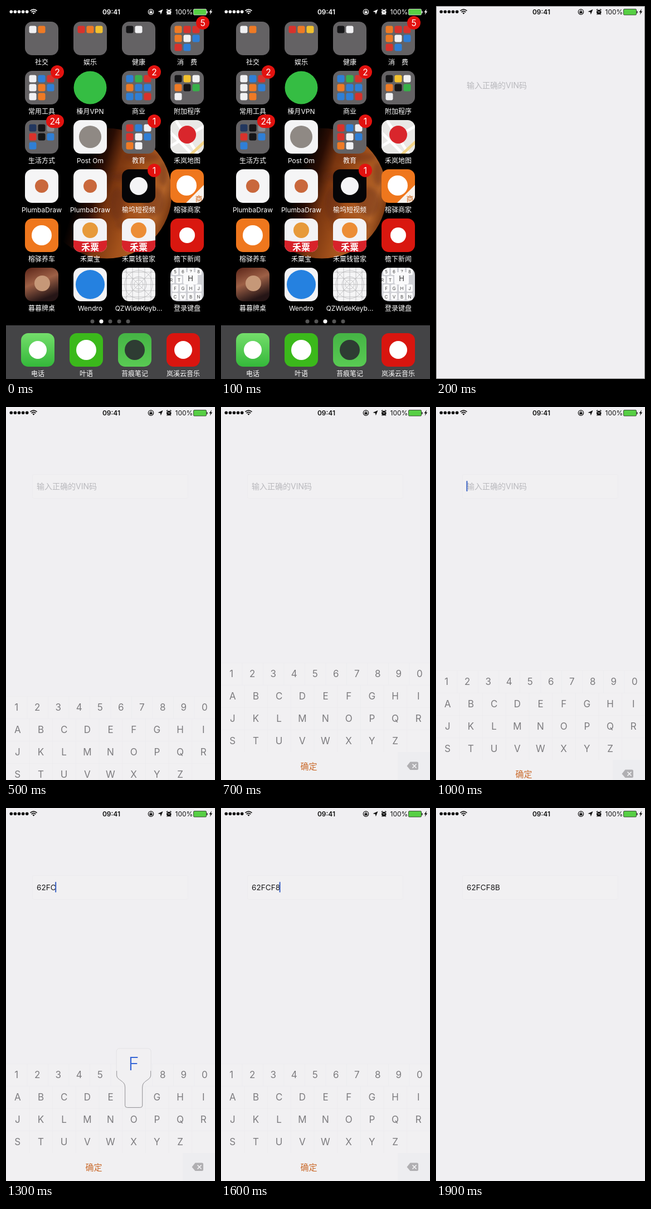
These frames come from a looping animation (375x667 px, 2 s). An HTML page:

```html
<!DOCTYPE html>
<html lang="zh-CN">
<head>
<meta charset="utf-8">
<title>Keyboard demo</title>
<style>
html, body { margin: 0; width: 100%; height: 100%; overflow: hidden; background: #000; }
svg { display: block; width: 375px; height: 667px; font-family: Inter, "Noto Sans CJK SC", "Noto Sans CJK", sans-serif; }
text { white-space: pre; }
.mid { text-anchor: middle; }
.label { font-size: 12px; fill: #fff; text-anchor: middle; }
.key { font-size: 17px; fill: #7c7b7e; text-anchor: middle; }
</style>
</head>
<body>
<svg id="stage" viewBox="0 0 375 667">
  <defs>
    <linearGradient id="mars" gradientUnits="userSpaceOnUse" x1="138" y1="305" x2="296" y2="355">
      <stop stop-color="#000"/><stop offset=".18" stop-color="#2a0d04"/><stop offset=".34" stop-color="#7a3610"/>
      <stop offset=".6" stop-color="#a4521b"/><stop offset=".88" stop-color="#b5652a"/><stop offset="1" stop-color="#7c3a12"/>
    </linearGradient>
    <linearGradient id="phone" x2="0" y2="1"><stop stop-color="#74de6b"/><stop offset="1" stop-color="#34b83a"/></linearGradient>
    <linearGradient id="notes" x2="0" y2="1"><stop stop-color="#45b445"/><stop offset="1" stop-color="#59ca53"/></linearGradient>
    <linearGradient id="cards" x2=".4" y2="1"><stop stop-color="#5a2418"/><stop offset=".5" stop-color="#9d6046"/><stop offset="1" stop-color="#251516"/></linearGradient>
    <clipPath id="disc"><circle cx="181" cy="335" r="116.500"/></clipPath>
    <clipPath id="tile"><rect width="60" height="60" rx="13"/></clipPath>
    <filter id="soft"><feGaussianBlur stdDeviation="4"/></filter>
  </defs>
  <g id="home"></g>
  <g id="app">
    <rect width="375" height="667" fill="#f0eff2"/>
    <rect id="edge" x=".5" y=".5" width="374" height="666" fill="none" stroke="#777"/>
    <rect id="field" x="47.5" y="120.5" width="279" height="43" rx="3" fill="#f1f0f2" stroke="#ecebee"/>
    <text id="entry" x="55" y="146.600"></text>
    <rect id="caret" y="132" width="2" height="19" rx="1" fill="#3a62c4"/>
    <g id="keyboard"></g>
    <g id="popup">
      <path d="M199 436q0-6 6-6h50q6 0 6 6v42c0 9-15 9-15 21v33q0 4-4 4h-24q-4 0-4-4v-33c0-12-15-12-15-21z" fill="#f1f0f2" stroke="#e3e2e5"/>
      <path d="M199.500 470v8c0 9 15 9 15 21v33q0 3.500 4 3.500h23q4 0 4-3.500v-33c0-12 15-12 15-21v-8" fill="none" stroke="#97969a"/>
      <text id="popLetter" class="mid" x="230" y="469" font-size="32" font-weight="300" fill="#3566d6"></text>
    </g>
  </g>
  <g id="status"></g>
</svg>
<script>
const $ = id => document.getElementById(id);
const show = (id, on) => $(id).style.display = on ? '' : 'none';
const rect = (x, y, w, h, fill, rx = 0) => `<rect x="${x}" y="${y}" width="${w}" height="${h}" rx="${rx}" fill="${fill}"/>`;
const circle = (x, y, r, fill) => `<circle cx="${x}" cy="${y}" r="${r}" fill="${fill}"/>`;
const text = (x, y, str, attrs) => `<text x="${x}" y="${y}" ${attrs}>${str}</text>`;
const at = (x, y, body) => `<g transform="translate(${x} ${y})">${body}</g>`;

const tints = { r: '#d8322c', o: '#ee7a25', b: '#2f7fd6', w: '#f1f1f3', k: '#151517', g: '#38b04a',
  y: '#f2c12e', n: '#22375f', s: '#8b8b90' };
const tile = (fill, body = '') => `<g clip-path="url(#tile)">${rect(0, 0, 60, 60, fill)}${body}</g>`;
const mark = (fill, color, r) => tile(fill, circle(30, 30, r, color));
const folder = minis => tile('#646264', [...minis].map((c, i) =>
  rect(7.5 + i % 3 * 16, 7.5 + Math.floor(i / 3) * 16, 13, 13, tints[c], 3)).join(''));
const banner = color => tile('#f3f3f5', circle(30, 21, 14, color) +
  '<path d="M0 39q30 5 60 0v21H0z" fill="#d8222a"/>' +
  text(30, 57, '禾粟', 'class="mid" font-size="16" font-weight="700" fill="#fff"'));

function mapTile() {
  return tile('#e9e8e6', '<path d="M-2 48L62 10M8-2L50 62M-2 20L40 62" stroke="#fff" stroke-width="5"/>' +
    '<path d="M36 62L62 38" stroke="#f3d488" stroke-width="5"/>' + circle(30, 26, 16, '#d9262c'));
}
function gridTile() {
  let lines = '';
  for (let p = 8; p < 60; p += 11) lines += `M${p} 0V60M0 ${p}H60`;
  const rings = [8, 14, 25].map(r => `<circle cx="30" cy="30" r="${r}"/>`).join('');
  return tile('#f5f5f6', `<g fill="none" stroke="#b0b0b4" stroke-width=".7"><path d="${lines}M0 0L60 60M60 0L0 60"/>${rings}</g>`);
}
function keysTile() {
  const cap = (x, y, c) => rect(x, y, 11, 13, '#fafafb', 2) +
    text(x + 5.5, y + 10, c, 'class="mid" font-size="8" fill="#444"');
  const row = (chars, x, y) => [...chars].map((c, i) => cap(x + i * 14, y, c)).join('');
  return tile('#cfd0d5', row('5678', 3, 0) + row('RTYU', -4, 15) + row('FGHJ', 3, 30) + row('CVBN', 3, 45) +
    rect(23, 8, 26, 22, '#fafafb', 4) + text(36, 24, 'H', 'class="mid" font-size="13" fill="#333"'));
}

const shopTile = tile('#ef771d', circle(29, 29, 18, '#fff') + '<path d="M60 28V60H28z" fill="#f8f3ee"/>' +
  text(51, 57, '商', 'class="mid" font-size="13" fill="#d2691e"'));
const drawTile = mark('#f5f5f6', '#c9683c', 12);

const apps = [
  ['社交', folder('wo')], ['娱乐', folder('roy')], ['健康', folder('kw')], ['消　费', folder('orrowbrb'), 5],
  ['常用工具', folder('wbrwobwo'), 2], ['榛月VPN', circle(30, 30, 29.5, '#35bd43')],
  ['商业', folder('bgrobbbbr'), 2], ['附加程序', folder('kywokgw')],
  ['生活方式', folder('nksrkbb'), 24], ['Post Om', mark('#f4f4f5', '#8f8984', 20)],
  ['教育', folder('rbwrwbow'), 1], ['禾岚地图', mapTile()],
  ['PlumbaDraw', drawTile], ['PlumbaDraw', drawTile],
  ['榆坞短视频', mark('#050507', '#f4f4f6', 16), 1], ['榕驿商家', shopTile],
  ['榕驿养车', mark('#ef771d', '#fff', 18)], ['禾粟宝', banner('#e79a3a')],
  ['禾粟钱管家', banner('#ec8d35')], ['檐下新闻', mark('#d9170f', '#fff', 14)],
  ['暮暮牌桌', tile('url(#cards)', circle(31, 28, 14, '#c69878'))], ['Wendro', mark('#f3f3f5', '#2581e0', 26)],
  ['QZWideKeyb...', gridTile()], ['登录键盘', keysTile()]
];
const dock = [
  ['电话', mark('url(#phone)', '#fff', 16)], ['叶语', mark('#3bb91b', '#fff', 18)],
  ['苔痕笔记', mark('url(#notes)', '#2e3c33', 18)], ['岚溪云音乐', mark('#d9150f', '#fff', 16)]
];

function badge(count) {
  const w = count > 9 ? 32 : 24;
  return rect(70 - w, -10, w, 24, '#e3120f', 12) +
    text(70 - w / 2, 7.5, count, 'class="mid" font-size="15.500" fill="#fff"');
}
const place = ([name, art, count], x, y) => at(x, y, art + text(30, 76.5, name, 'class="label"') + (count ? badge(count) : ''));
const column = i => 27 + i % 4 * 87;

const spots = [[245, 270, 34, 9], [212, 305, 30, 8], [265, 350, 20, 26], [232, 392, 36, 9], [282, 300, 9, 22], [200, 355, 14, 30]]
  .map(([x, y, a, b]) => `<ellipse cx="${x}" cy="${y}" rx="${a}" ry="${b}"/>`).join('');
$('home').innerHTML = rect(0, 0, 375, 667, '#000') +
  `<g clip-path="url(#disc)">${rect(60, 210, 250, 250, 'url(#mars)')}<g fill="#5c2812" opacity=".4" filter="url(#soft)">${spots}</g></g>` +
  `<g id="page">${apps.map((a, i) => place(a, column(i), 28 + Math.floor(i / 4) * 88)).join('')}</g>` +
  [0, 1, 2, 3, 4].map(i => circle(155 + i * 16, 564, 3.5, '#555')).join('') +
  '<circle id="dot" cy="564" r="3.500" fill="#fff"/>' +
  rect(0, 571, 375, 96, '#444446') + dock.map((a, i) => place(a, column(i), 585)).join('');

// Status bar, drawn in the current colour
const ink = 'currentColor';
$('status').innerHTML = [0, 1, 2, 3, 4].map(i => circle(9.3 + i * 7.1, 10.3, 2.8, ink)).join('') +
  `<g fill="none" stroke="${ink}" stroke-width="1.700"><path d="M43.500 8.700q6-5 12 0M45.700 11q3.800-3.200 7.600 0"/>
   <circle cx="260" cy="10.500" r="4.700" stroke-width="1.200"/><path d="M258.500 10v-1.200q1.500-2 3 0v1.200" stroke-width="1"/></g>
   <path d="M49.500 14.800l-2-2.200q2-1.600 4 0zM257.500 9.800h5v3.500h-5zM281.500 6l-3.700 9.300-1-4.200-4.300-1z" fill="${ink}"/>` +
  circle(292.3, 11, 4.3, ink) +
  `<path d="M288 7.300l2-1.700M296.500 7.300l-2-1.700M289.500 14.500l-.8 1M295 14.500l.8 1" stroke="${ink}" stroke-width="1.400"/>
   <path id="hands" d="M290 9.500l2.300 1.700 2.200-1.400" fill="none"/>` +
  text(189, 14.7, '09:41', `class="mid" font-size="12" font-weight="600" fill="${ink}"`) +
  text(303.5, 14.7, '100%', `font-size="12" fill="${ink}"`) +
  `<rect x="336.500" y="5.500" width="23" height="10.500" rx="1.500" fill="#57cf45" stroke="${ink}" stroke-width=".7"/>` +
  rect(360.3, 9, 1.3, 4, ink, .6) + `<path d="M369 5l-4.500 6.200h2.500l-1.300 4.600 4.600-6.200h-2.600z" fill="${ink}"/>`;

const rows = ['1234567890', 'ABCDEFGHI', 'JKLMNOPQR', 'STUVWXYZ'];
const keyWidth = r => r ? 375 / 9 : 37.5;
let keys = rect(0, 456, 375, 211, '#f1f0f2') + rect(317, 617, 58, 50, '#ededf0');
rows.forEach((row, r) => {
  const w = keyWidth(r), top = 457 + r * 40;
  [...row].forEach((c, i) => {
    keys += rect(w * (i + 1), top, .8, 40, '#ecebee') + text(w * (i + .5), top + 26, c, 'class="key"');
  });
  keys += rect(0, top, 375, .8, '#edecef');
});
$('keyboard').innerHTML = keys + text(157.5, 647.5, '确定', 'class="mid" font-size="15" fill="#c9692a"') +
  '<path d="M333.500 642l6-7.500h12q2.500 0 2.500 2.500v9.500q0 2.500-2.500 2.500h-12z" fill="#b0afb2"/>' +
  '<path d="M343.500 638.500l7 7m0-7l-7 7" stroke="#f4f4f6" stroke-width="1.700"/>';

// One step per 100 ms: keyboard drop in px (null = hidden), typed text, pressed key, caret
const steps = [
  [null], [null], [null], [null], [null], [60], [0, '', '', 1], [0], [null], [null],
  [14, '', '', 1], [0, '', '', 1], [0, '62', '', 1], [0, '62FC', 'F', 1], [0, '62FCF', '', 1],
  [0, '62FCF', '8', 1], [0, '62FCF8', '', 1], [0, '62FCF8', 'B', 1], [0, '62FCF8B', '', 1], [null, '62FCF8B']
];
const entry = $('entry');
let current = -1;

function render(n) {
  const [drop, typed = '', pressed = '', caret] = steps[n], home = n < 2;
  show('home', home);
  show('app', !home);
  $('page').setAttribute('transform', `translate(${n ? 0 : 7})`);
  $('dot').setAttribute('cx', n ? 187 : 171);
  $('status').style.color = home ? '#fff' : '#111';
  $('hands').style.stroke = home ? '#000' : '#f0f0f2';
  show('edge', n === 2);
  show('field', n > 2);
  entry.textContent = typed || '输入正确的VIN码';
  entry.setAttribute('fill', typed ? '#1a1a1c' : '#b9b9bd');
  entry.setAttribute('font-size', typed ? 13.6 : 14);
  show('caret', caret);
  if (caret) $('caret').setAttribute('x', 54.5 + (typed ? entry.getComputedTextLength() - 1 : 0));
  show('keyboard', drop != null);
  $('keyboard').setAttribute('transform', `translate(0 ${drop || 0})`);
  show('popup', pressed);
  if (pressed) {
    const r = rows.findIndex(row => row.includes(pressed));
    const x = keyWidth(r) * (rows[r].indexOf(pressed) + .5);
    $('popup').setAttribute('transform', `translate(${x - 230} ${(r - 1) * 40})`);
    $('popLetter').textContent = pressed;
  }
}

const start = performance.now();
function tick() {
  const n = Math.floor((performance.now() - start) % 2000 / 100);
  if (n !== current) render(current = n);
  requestAnimationFrame(tick);
}
tick();
</script>
</body>
</html>
```
